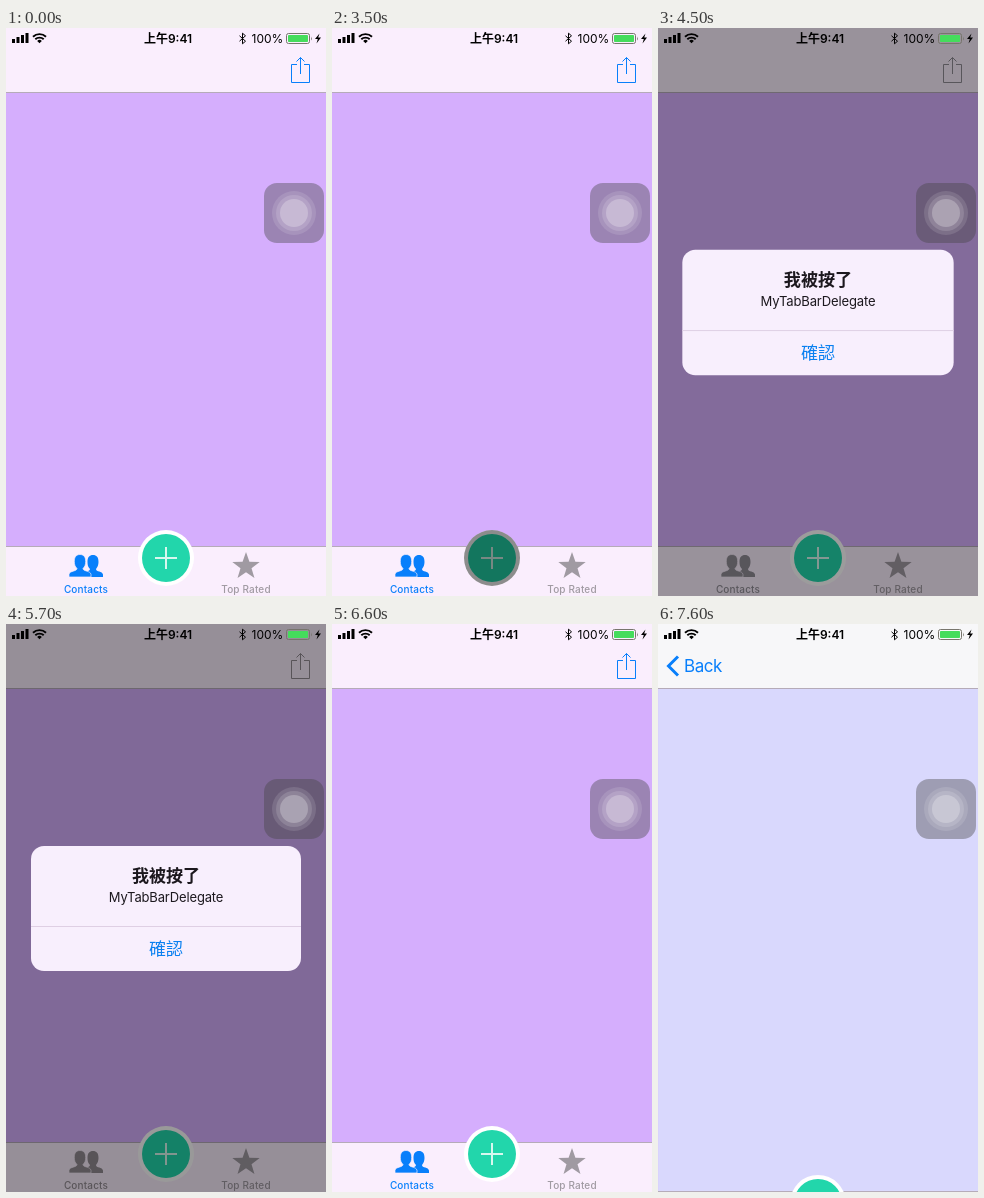
An HTML page that plays this animation: 320 by 568 pixels, repeating every 8000 ms.

```html
<!DOCTYPE html>
<html lang="zh-Hant">
<head>
<meta charset="utf-8">
<title>Tab bar with a centre button</title>
<style>
  html, body { margin: 0; width: 100%; height: 100%; overflow: hidden; background: #fff; }
  svg { display: block; width: 320px; height: 568px; }
  text { font-family: Inter, "Noto Sans CJK TC", "Noto Sans CJK", sans-serif; text-anchor: middle; }
  .bar { fill: var(--bar); }
  .rule { fill: #b5abb8; }
  .tint { fill: var(--tint); }
  .gray { fill: #a09aa2; }
  .line { fill: none; stroke: var(--tint); }
  .label { font-size: 10px; font-weight: 500; letter-spacing: .15px; }
  .status { font-size: 12px; }
</style>
</head>
<body>
<svg viewBox="0 0 320 568">
  <rect id="oldView" width="330" height="568" fill="#d5aefd"/>
  <rect id="newView" width="320" height="568" fill="#d9d8fd"/>

  <g id="tabBar">
    <rect class="bar" y="518" width="320" height="50"/>
    <rect class="rule" y="518" width="320" height="1"/>
    <g class="tint">
      <path d="M81 549c2-2 1-4-1-5 2-1 4-1.500 4-3-2-2-2.500-4-2.500-7 0-5 2-7 5.500-7s5.500 2 5.500 7c0 3-1 5-2.500 7 0 3 6.500 2 7 5.500v2.500z"/>
      <path d="M63 549v-2.500c.5-4 8-3 8-6-2-2-2.700-4-2.700-7 0-5 2.300-7 5.700-7s5.700 2 5.700 7c0 3-.7 5-2.700 7 0 3 7.500 2 8 6v2.500z" stroke="var(--bar)" stroke-width=".7"/>
      <text class="label" x="80" y="565">Contacts</text>
    </g>
    <g class="gray">
      <path id="star"/>
      <text class="label" x="240" y="565">Top Rated</text>
    </g>
    <circle cx="160" cy="530" r="28" fill="#fff"/>
    <circle cx="160" cy="530" r="24" fill="#22d6ab"/>
    <path d="M149 530h22M160 519v22" stroke="#d8f7ee" stroke-width="2"/>
    <circle id="press" cx="160" cy="530" r="28" opacity=".45"/>
  </g>

  <rect class="bar" width="320" height="64"/>
  <rect class="rule" y="64" width="320" height="1"/>
  <path id="share" class="line" d="M291 36.500h-5.500v18h18v-18h-5.500M294.500 46V29.500M290.500 33.500l4-4 4 4"/>
  <g id="back">
    <path class="line" d="M20 32.500l-9.500 9.500 9.500 9.500" stroke-width="3"/>
    <text id="backLabel" class="tint" x="26" y="48" font-size="17" letter-spacing="-.5" style="text-anchor:start">Back</text>
  </g>

  <rect id="shade" width="320" height="568"/>

  <g id="alert">
    <rect x="25" y="222" width="270" height="125" rx="13" fill="#f8effd"/>
    <rect x="25" y="302" width="270" height="1" fill="#dfcfe4"/>
    <text x="160" y="258" font-size="17" font-weight="600" fill="#1c181e">我被按了</text>
    <text x="160" y="278" font-size="13" letter-spacing="-.15" fill="#1c181e">MyTabBarDelegate</text>
    <text x="160" y="331" font-size="17" fill="#0a80f0">確認</text>
  </g>

  <rect x="258" y="155" width="60" height="60" rx="13" fill="#444" opacity=".4"/>
  <g fill="#fff">
    <circle cx="288" cy="185" r="22" opacity=".12"/>
    <circle cx="288" cy="185" r="18" opacity=".14"/>
    <circle cx="288" cy="185" r="14" opacity=".25"/>
  </g>

  <path d="M6 11h3v4h-3zM10.500 9h3v6h-3zM15 7h3v8h-3zM19.500 5h3v10h-3z"/>
  <g fill="none" stroke="#000" stroke-width="1.900">
    <path d="M27 8.800a9.300 9.300 0 0 1 13 0M29.300 11.300a6 6 0 0 1 8.400 0"/>
    <path d="M233.500 7.800l6 5.400-3 2.600V5.200l3 2.600-6 5.400" stroke-width="1"/>
  </g>
  <path d="M33.500 15.300l-2.300-2.400a3.300 3.300 0 0 1 4.600 0z"/>
  <text class="status" x="162" y="14.500" font-weight="600">上午9:41</text>
  <text class="status" x="261.500" y="14.500">100%</text>
  <rect x="280.500" y="5.500" width="23" height="10" rx="2" fill="none" stroke="#77756c"/>
  <rect x="282" y="7" width="20" height="7" rx=".8" fill="#45dc5c"/>
  <path d="M305 8.500q1.500 2 0 4z" fill="#77756c"/>
  <path d="M313.500 5.500l-4.500 5.500h2.800l-1.300 4.500 4.500-6h-2.800z"/>
</svg>
<script>
const LOOP = 8000, STEP = 100;
const BLUE = [8, 127, 251], MUTED = [146, 140, 146];
const BAR = [250, 238, 253], PUSHED_BAR = [247, 247, 249];
const $ = id => document.getElementById(id);

const mix = (a, b, k) => `rgb(${a.map((v, i) => Math.round(v + (b[i] - v) * k))})`;
const place = (id, x, y) => $(id).setAttribute("transform", `translate(${x} ${y})`);
const fade = (id, opacity) => $(id).setAttribute("opacity", opacity);

// Critically damped spring from 0 to 1
const spring = (t, start, rate) => {
  const x = Math.max(0, t - start) / 1000 * rate;
  return 1 - (1 + x) * Math.exp(-x);
};

const starPoints = Array.from({ length: 10 }, (_, i) => {
  const r = i % 2 ? 5.8 : 14.4, a = i * Math.PI / 5;
  return [240 + r * Math.sin(a), 538.4 - r * Math.cos(a)];
});
$("star").setAttribute("d", "M" + starPoints.join("L") + "z");

function draw(t) {
  const shown = spring(t, 3850, 8.6);
  const hidden = spring(t, 5700, 10);
  const push = spring(t, 6750, 12);
  const dim = shown * (1 - hidden);

  const style = document.body.style;
  style.setProperty("--tint", mix(BLUE, MUTED, dim));
  style.setProperty("--bar", mix(BAR, PUSHED_BAR, push));
  fade("shade", 0.4 * dim);
  fade("press", t >= 3500 && t < 3600 ? 0.45 : 0);

  place("oldView", -96 * push, 0);
  place("newView", 320 * (1 - push), 0);
  place("tabBar", 0, 49 * push);
  place("backLabel", 120 * (1 - push), 0);
  fade("share", 1 - push);
  fade("back", push);

  const scale = 1.2 - 0.2 * shown;
  $("alert").setAttribute("transform",
    `translate(160 284.5) scale(${scale}) translate(-160 -284.5)`);
  fade("alert", Math.min(1, shown * 1.25) * (1 - hidden));
}

function tick() {
  const t = performance.now() % LOOP;
  draw(Math.floor(t / STEP) * STEP);
  requestAnimationFrame(tick);
}
tick();
</script>
</body>
</html>
```
